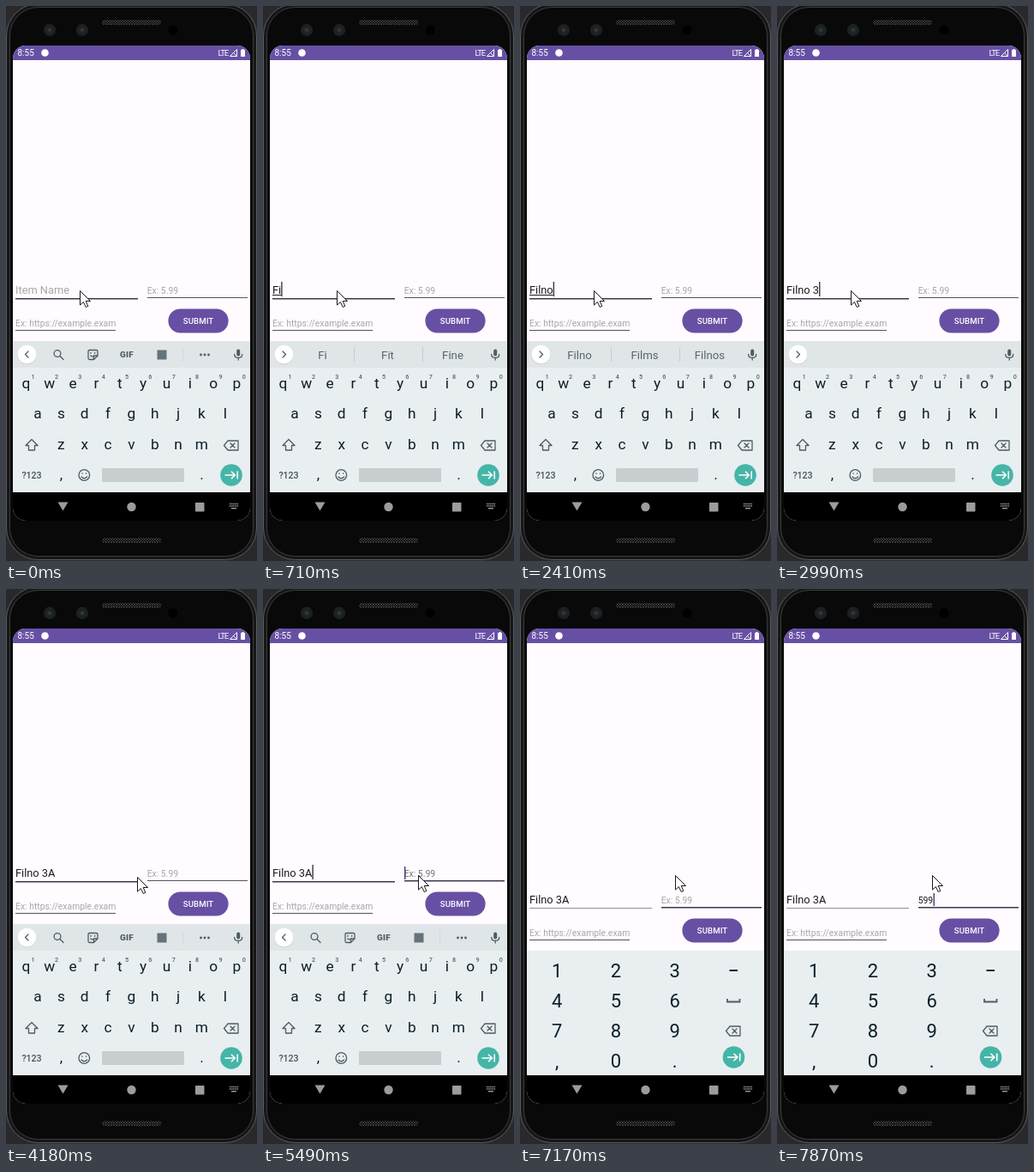
These frames come from a looping animation (293x646 px, 8000 ms). An HTML page:

```html
<!DOCTYPE html>
<html lang="en">
<head>
<meta charset="utf-8">
<title>Item form</title>
<style>
  html, body { margin: 0; width: 100%; height: 100%; overflow: hidden; background: #29292b; }
  svg { display: block; width: 293px; height: 646px; }
  text { font-family: Roboto, sans-serif; white-space: pre; }
  .mid { text-anchor: middle; }
  .key { font-size: 17.3px; fill: #0a1f28; }
  .num { font-size: 22px; fill: #0a1f28; }
  .sup { font-size: 7.2px; font-weight: 500; fill: #56656c; }
  .word { font-size: 13.2px; fill: #56656c; }
  .name { font-size: 12.8px; }
  .small { font-size: 10.4px; }
  .hint { fill: #aaa7aa; }
  .typed { fill: #1c1b1f; }
  .line { fill: none; stroke: #4d5c63; stroke-width: 1.3; stroke-linejoin: round; stroke-linecap: round; }
</style>
</head>
<body>
<svg viewBox="0 0 293 646">
  <defs>
    <pattern id="mesh" width="3" height="3" patternUnits="userSpaceOnUse">
      <path d="M0 3L3 0M0 0L3 3" stroke="#4b4b4b" stroke-width=".7"/>
    </pattern>
    <radialGradient id="lens">
      <stop offset="0" stop-color="#3a474d"/>
      <stop offset=".4" stop-color="#1f2427"/>
      <stop offset="1" stop-color="#1c1d1e"/>
    </radialGradient>
    <clipPath id="screen"><rect x="8" y="46" width="277" height="553" rx="15"/></clipPath>
    <clipPath id="urlClip"><rect x="11" y="355" width="117.5" height="30"/></clipPath>
    <g id="back">
      <path class="line" d="M-8.5 0L-4 -5.5H8V5.5H-4ZM-1 -2.5L4 2.5M4 -2.5L-1 2.5"/>
    </g>
    <g id="next">
      <circle r="12.8" fill="#45b5a8"/>
      <path d="M-7.5 0H4M0 -4.2L4.3 0L0 4.2M7.2 -4.5V4.5" fill="none" stroke="#fff" stroke-width="1.6"/>
    </g>
  </defs>

  <!-- phone body -->
  <rect x=".5" y="-2.5" width="292" height="647" rx="37" fill="#161617" stroke="#5c5c5e"/>
  <rect x="4.5" y="1.5" width="284" height="639" rx="33" fill="#090909" stroke="#3c3c3e"/>
  <g fill="url(#mesh)">
    <rect x="112" y="16" width="69" height="6" rx="3"/>
    <rect x="112" y="619" width="69" height="6" rx="3"/>
  </g>
  <g fill="url(#lens)"><circle cx="51" cy="28" r="7.2"/><circle cx="89" cy="28" r="7.2"/></g>
  <circle cx="195" cy="28" r="5.5" fill="#000"/>

  <g clip-path="url(#screen)">
    <rect x="8" y="46" width="277" height="553" fill="#fffbfe"/>
    <rect x="8" y="46" width="277" height="17" fill="#6750a4"/>
    <g fill="#fff">
      <text x="13.5" y="58.4" font-size="10">8:55</text>
      <circle cx="45.5" cy="54.5" r="4.3"/>
      <text x="247.5" y="58.4" font-size="9.6" letter-spacing="-1.2">LTE</text>
      <path d="M261.5 58.5L269.5 50.5V58.5ZM265.5 54.5L269.5 58.5" fill="none" stroke="#fff"/>
      <path d="M274 51H275.5V50H277.5V51H279V59H274Z"/>
    </g>

    <g id="form">
      <text id="name" class="name" x="11" y="334.8"></text>
      <rect id="compose" x="11" y="336" height="1" fill="#1c1b1f"/>
      <rect id="nameLine" x="11" y="340" width="143"/>
      <rect id="nameCaret" y="321" width="1.4" height="17" fill="#3a373e"/>
      <text id="price" class="small" x="164.7" y="335"></text>
      <rect id="priceLine" x="165" y="339" width="117"/>
      <rect id="priceCaret" y="323" width="1.4" height="15" fill="#4a3c70"/>
      <g clip-path="url(#urlClip)"><text class="small hint" x="11" y="372.8">Ex: https://example.example</text></g>
      <rect x="11" y="377" width="117" height="1" fill="#56535a"/>
      <rect x="189.4" y="352.4" width="70.2" height="28.2" rx="14.1" fill="#6750a4"/>
      <text class="mid" x="224.5" y="370" font-size="9.6" font-weight="500" letter-spacing=".1" fill="#fff">SUBMIT</text>
    </g>

    <g id="letters">
      <rect x="8" y="390" width="277" height="176" fill="#e9eef1"/>
      <rect x="8" y="390" width="277" height="31" fill="#e0e5e8"/>
      <circle cx="24.5" cy="406.3" r="11" fill="#000" opacity=".1"/>
      <circle cx="24.5" cy="405.5" r="10.8" fill="#fff"/>
      <path id="chevron" class="line"/>
      <g id="tools">
        <circle class="line" cx="60" cy="404.5" r="3.9"/>
        <path class="line" d="M63 407.5L67 411.5"/>
        <path class="line" d="M97.5 400.5H105.5Q107 400.5 107 402V407L102.5 411.5H97.5Q96 411.5 96 410V402Q96 400.5 97.5 400.5ZM102.5 411V407H106.5M99 403.5V404.3M103.7 403.5V404.3M98.8 407Q100 408.3 101.5 407.6"/>
        <text class="mid" x="141" y="409.3" font-size="9.8" font-weight="900" letter-spacing=".3" fill="#4d5c63">GIF</text>
        <rect x="176.5" y="400.5" width="11" height="11" fill="#65737a"/>
        <path d="M206.5 398V414" stroke="#d2d8db"/>
        <g fill="#4d5c63"><circle cx="227.5" cy="406" r="1.4"/><circle cx="232" cy="406" r="1.4"/><circle cx="236.5" cy="406" r="1.4"/></g>
      </g>
      <g id="words">
        <path d="M106.5 397V414M186.5 397V414" stroke="#c5cccf"/>
        <text class="word mid" x="69.5" y="410.5"></text>
        <text class="word mid" x="145.5" y="410.5"></text>
        <text class="word mid" x="221.5" y="410.5"></text>
      </g>
      <rect x="269.2" y="399.5" width="4" height="8" rx="2" fill="#4d5c63"/>
      <path class="line" d="M266.7 405.5Q266.7 409.5 271.2 409.5Q275.7 409.5 275.7 405.5M271.2 409.5V412"/>
      <g id="keys"></g>
      <path class="line" d="M30 504.5L37 511.5H33.5V517H26.5V511.5H23Z"/>
      <use href="#back" x="263" y="511.5"/>
      <text class="mid" x="30" y="549.8" font-size="10.6" font-weight="500" fill="#42525a">?123</text>
      <circle class="line" cx="91.3" cy="546" r="6.3"/>
      <path class="line" d="M89 543.8V544.3M93.6 543.8V544.3M88 548Q91.3 551.5 94.6 548"/>
      <rect x="112" y="538" width="96" height="16" rx="1" fill="#c9cdcf"/>
      <use href="#next" x="263" y="546"/>
    </g>

    <g id="digits">
      <rect x="8" y="421" width="277" height="145" fill="#e9eef1"/>
      <g id="pad"></g>
      <path d="M244.5 444H254" stroke="#0a1f28" stroke-width="2"/>
      <path d="M242 477V480.5H256.5V477" fill="none" stroke="#4d5c63" stroke-width="1.8"/>
      <use href="#back" x="249" y="514.5"/>
      <use href="#next" x="249.5" y="545"/>
    </g>

    <rect x="8" y="566" width="277" height="33" fill="#000"/>
    <g fill="#9c9c9c">
      <path d="M60.5 577.5H72.5L66.5 587.5Z"/>
      <circle cx="146.5" cy="583" r="5.2"/>
      <rect x="221" y="578" width="10.5" height="10.5" rx=".8"/>
      <path d="M261 579.5H271M261 582H271" stroke="#9c9c9c" stroke-width="1.4" stroke-dasharray="1.4 .75"/>
      <rect x="263" y="584" width="6" height="1.4"/>
    </g>
  </g>
  <path id="mouse" d="M0 0V16.6L3.9 13L6.7 19L9.3 17.9L6.7 12H12Z" fill="#fff" stroke="#1a1a1a" stroke-linejoin="round"/>
</svg>

<script>
const LOOP = 8000, SHIFT = 31, PITCH = 27.35, CENTER = 146.4;
const $ = id => document.getElementById(id);
const set = (el, attrs) => { for (const k in attrs) el.setAttribute(k, attrs[k]); };
const show = (id, on) => set($(id), { display: on ? 'inline' : 'none' });
const label = (cls, x, y, s) => `<text class="${cls} mid" x="${x}" y="${y}">${s}</text>`;

// Keyboards: every letter row is centred on the screen
const row = (chars, y, cls = 'key', dx = 0) => [...chars].map((c, i) =>
  label(cls, CENTER + dx + (i - (chars.length - 1) / 2) * PITCH, y, c)).join('');
$('keys').innerHTML =
  row('qwertyuiop', 445) + row('asdfghjkl', 480.3) + row('zxcvbnm', 516.3) +
  row('1234567890', 434, 'sup', 8.3) +
  label('key', 64.5, 551, ',') + label('key', 228.5, 551, '.');
$('pad').innerHTML = ['123', '456', '789', ',0.'].map((line, r) =>
  [...line].map((c, i) => label('num', 43.2 + i * 68.7, 451.8 + r * 35.1, c)).join('')).join('');

// Each step changes part of the state; strip is 'tools', 'empty' or a word list.
const steps = [
  [0, { name: '', price: '', compose: 0, caret1: 0, caret2: 0, strip: 'tools', open: 0, focus: 1, tapped: 0, pad: 0, mouse: [86, 331] }],
  [150, { name: 'F', compose: 1, caret1: 1, open: 1, strip: ['F', 'For', 'First'] }],
  [560, { name: 'Fi' }],
  [710, { strip: ['Fi', 'Fit', 'Fine'] }],
  [1020, { name: 'Fil' }],
  [1150, { strip: ['Fil', 'Fill', 'File'] }],
  [1290, { strip: ['Fil', 'Fig', 'Filno'] }],
  [1880, { name: 'Filn' }],
  [2000, { strip: ['Filn', 'Film', 'Filno'] }],
  [2410, { name: 'Filno', strip: ['Filno', 'Films', 'Filnos'] }],
  [2560, { name: 'Filno ', compose: 0, strip: ['and', 'is', 'charger'] }],
  [2990, { name: 'Filno 3', strip: 'empty' }],
  [3140, { open: 0, strip: 'tools' }],
  [3440, { name: 'Filno 3A' }],
  [3880, { caret1: 0 }],
  [4030, { mouse: [112, 335] }],
  [4180, { mouse: [153, 335] }],
  [4330, { mouse: [175, 335] }],
  [4450, { caret1: 1 }],
  [4600, { mouse: [181, 334] }],
  [4920, { caret1: 0 }],
  [5070, { mouse: [181, 333] }],
  [5340, { caret1: 1 }],
  [5490, { focus: 2, tapped: 1, caret2: 1 }],
  [5640, { caret1: 0, tapped: 0, pad: 1 }],
  [6160, { caret2: 0 }],
  [6590, { caret2: 1 }],
  [7170, { caret2: 0 }],
  [7570, { price: '5', caret2: 1 }],
  [7720, { price: '59' }],
  [7870, { price: '599' }]
];
const states = [];
steps.forEach(([, change], i) => states.push({ ...states[i - 1], ...change }));

function field(id, value, hint, size) {
  const el = $(id);
  el.textContent = value || hint;
  el.setAttribute('class', `${size} ${value ? 'typed' : 'hint'}`);
  return value ? el.getComputedTextLength() : 0;
}

function underline(id, focused, idle) {
  set($(id), focused ? { height: 1.5, fill: '#3f3653' } : { height: 1, fill: idle });
}

function draw(s) {
  const w1 = field('name', s.name, 'Item Name', 'name');
  const w2 = field('price', s.price, 'Ex: 5.99', 'small');
  $('price').style.fill = s.tapped ? '#77747a' : '';
  set($('compose'), { width: s.compose ? w1 : 0 });
  set($('nameCaret'), { x: 11 + w1 });
  set($('priceCaret'), { x: 165 + w2 });
  show('nameCaret', s.caret1);
  show('priceCaret', s.caret2);
  underline('nameLine', s.focus === 1 || s.tapped, '#929094');
  underline('priceLine', s.focus === 2, '#56535a');

  set($('form'), { transform: `translate(0 ${s.pad ? SHIFT : 0})` });
  show('letters', !s.pad);
  show('digits', s.pad);

  const words = Array.isArray(s.strip);
  show('tools', s.strip === 'tools');
  show('words', words);
  if (words) $('words').querySelectorAll('text').forEach((t, i) => { t.textContent = s.strip[i]; });
  set($('chevron'), { d: s.open ? 'M23 402L26.5 405.5L23 409' : 'M26 402L22.5 405.5L26 409' });
  set($('mouse'), { transform: `translate(${s.mouse[0] + .5} ${s.mouse[1] + .5})` });
}

let shown = -1;
const start = performance.now();
function tick() {
  const t = (performance.now() - start) % LOOP;
  const i = steps.findLastIndex(([at]) => at <= t);
  if (i !== shown) draw(states[shown = i]);
  requestAnimationFrame(tick);
}
tick();
</script>
</body>
</html>
```
